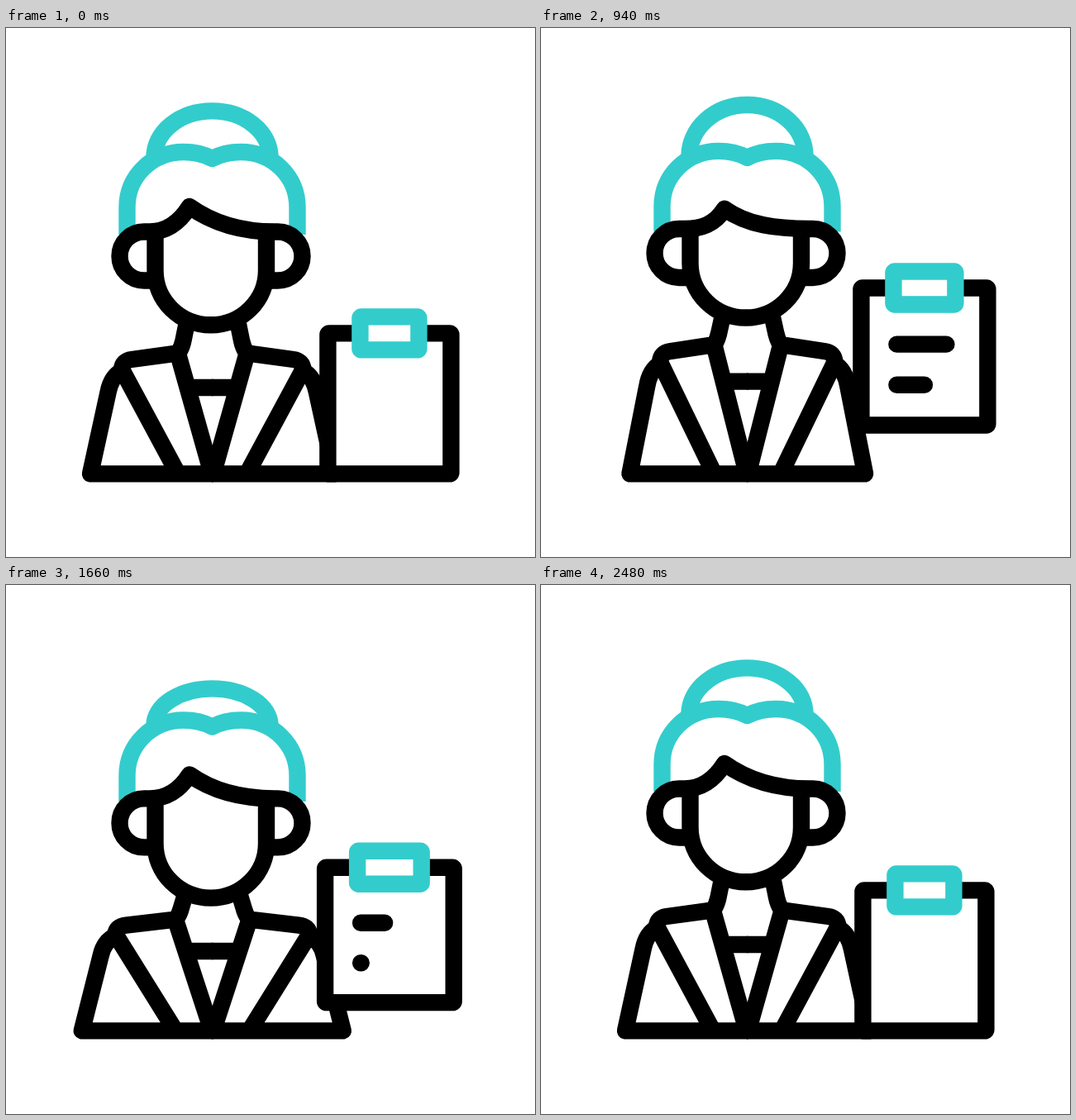
Animation, 640 px wide and 640 px high, one loop 2840 ms. Source, as an HTML page with a canvas:

```html
<!DOCTYPE html>
<html lang="en">
<head>
<meta charset="utf-8">
<title>Assistant with clipboard</title>
<style>
  html, body { margin: 0; width: 100%; height: 100%; overflow: hidden; background: #fff; }
  canvas { display: block; width: 100vmin; height: 100vmin; }
</style>
</head>
<body>
<canvas id="stage" width="640" height="640"></canvas>
<script>
const ctx = document.getElementById('stage').getContext('2d');
const LOOP = 2840, STEP = 20;
const TEAL = '#33cccc', BLACK = '#000', WHITE = '#fff';
const FLOOR = 539.4, BODY_X = 249.75, HAIR_X = 249.5;

const smooth = u => u * u * (3 - 2 * u);
const easeOut = u => 1 - (1 - u) * (1 - u);

function ease(t, from, to, curve = smooth) {
  return curve(Math.min(1, Math.max(0, (t - from) / (to - from))));
}

// Crouch by dip, rise and hold, crouch again, bounce past rest and settle.
// Loose parts trail by lag on the way up and by half of it on the way down.
function swing(t, { dip, rise, bounce, lag = 0, curve = smooth }) {
  const up = 435 + lag, land = 1700 + lag / 2;
  return dip * ease(t, 200, up)
    - (dip + rise) * ease(t, up, up + 745, curve)
    + (rise + dip) * ease(t, 1480, land)
    - (dip + bounce) * ease(t, land, land + 350, curve)
    + bounce * ease(t, land + 350, land + 660);
}

const base = { dip: 12, rise: 7.4, bounce: 6, curve: easeOut };
const shoulder = { dip: 13.5, rise: 13, bounce: 5, curve: easeOut };
const chinMove = { dip: 23, rise: 19, bounce: 14 };
const earMove = { dip: 25, rise: 25.5, bounce: 18, lag: 100 };
const hairMove = { dip: 26, rise: 22, bounce: 15, lag: 100 };
const fringe = { dip: 30, rise: 24, bounce: 16.4, lag: 130 };
const bunMove = { dip: 27, rise: 16, bounce: 8.5, lag: -26 };

function stroke(color) {
  ctx.strokeStyle = color;
  ctx.stroke();
}

function drawBody(t, chin) {
  const sx = 1 + swing(t, base) / 147.5;
  const sy = 1 - swing(t, shoulder) / 146;
  const neckTop = FLOOR - (FLOOR - chin + 6) / sy;
  for (const side of [1, -1]) {
    ctx.save();
    ctx.translate(BODY_X, FLOOR);
    ctx.scale(side * sx, sy);
    ctx.translate(-BODY_X, -FLOOR);
    ctx.beginPath();
    // neck and inner lapel
    ctx.moveTo(219.5, neckTop);
    ctx.lineTo(214.5, 378);
    ctx.quadraticCurveTo(213, 386, 208, 394);
    ctx.lineTo(249, FLOOR);
    // shoulder and outer lapel
    ctx.moveTo(208, 393.4);
    ctx.lineTo(152, 401);
    ctx.quadraticCurveTo(141, 402.5, 140, 413);
    ctx.lineTo(208, FLOOR);
    // arm and hem
    ctx.moveTo(140, 415);
    ctx.quadraticCurveTo(127, 422, 123.5, 441);
    ctx.lineTo(102, FLOOR);
    ctx.lineTo(BODY_X + 1, FLOOR);
    // shirt edge
    ctx.moveTo(225, 435);
    ctx.lineTo(BODY_X + 1, 435);
    ctx.restore();
    stroke(BLACK);
  }
}

function drawHair(t, ear) {
  const top = 150 + swing(t, hairMove), bun = 100.4 + swing(t, bunMove), bunEnd = top + 6;
  ctx.beginPath();
  ctx.ellipse(HAIR_X, bunEnd, 70, bunEnd - bun, 0, Math.PI, 2 * Math.PI);
  stroke(TEAL);

  const right = 2 * HAIR_X;
  ctx.beginPath();
  ctx.moveTo(146.5, ear - 26);
  ctx.lineTo(146.5, top + 67);
  ctx.bezierCurveTo(146.5, top + 30, 176, top, 215, top);
  ctx.bezierCurveTo(228, top, 240, top + 3, HAIR_X, top + 8);
  ctx.bezierCurveTo(right - 240, top + 3, right - 228, top, right - 215, top);
  ctx.bezierCurveTo(right - 176, top, right - 146.5, top + 30, right - 146.5, top + 67);
  ctx.lineTo(right - 146.5, ear - 26);
  stroke(TEAL);
}

function drawFace(t, chin, ear) {
  const r = 29.5, brow = ear - r, peak = 216 + swing(t, fringe);
  ctx.beginPath();
  ctx.moveTo(180.5, brow);
  ctx.lineTo(180.5, chin - 66);
  ctx.ellipse(247.75, chin - 66, 67.25, 66, 0, Math.PI, 0, true);
  ctx.lineTo(315, brow);
  ctx.fillStyle = WHITE;
  ctx.fill();
  stroke(BLACK);

  // ears joined by the fringe
  ctx.beginPath();
  ctx.moveTo(181, ear + r);
  ctx.arc(167, ear, r, Math.PI / 2, Math.PI * 1.5);
  ctx.lineTo(174, brow);
  ctx.bezierCurveTo(194, brow, 210, peak + 19, 222, peak);
  ctx.bezierCurveTo(250, peak + 20, 285, brow, 325, brow);
  ctx.arc(329, ear, r, -Math.PI / 2, Math.PI / 2);
  ctx.lineTo(315, ear + r);
  stroke(BLACK);
}

function panel(x, y, w, h, color) {
  ctx.beginPath();
  ctx.roundRect(x, y, w, h, 1.5);
  ctx.fillStyle = WHITE;
  ctx.fill();
  stroke(color);
}

function drawBoard(t) {
  const squash = 5.8 * (ease(t, 200, 600) - ease(t, 600, 1160) + ease(t, 1480, 1810) - ease(t, 1810, 2130));
  const stretch = 3.6 * (ease(t, 1810, 2130) - ease(t, 2130, 2480));
  const lift = 70 * (ease(t, 230, 1180) - ease(t, 1485, 1830));
  const width = 169 + 2 * (squash - stretch);
  const height = 190 - 2 * squash + 3 * stretch;
  const left = 463.9 - width / 2, top = 549.4 - lift - height;

  panel(left + 10, top + 10, width - 20, height - 20, BLACK);

  const lines = [
    [0.42, ease(t, 564, 1034) - ease(t, 1560, 1740)],
    [0.684, ease(t, 705, 1175) - ease(t, 1490, 1670)]
  ];
  ctx.lineCap = 'round';
  for (const [place, grown] of lines) {
    if (grown <= 0) continue;
    const x = left + 53, y = top + height * place;
    ctx.beginPath();
    ctx.moveTo(x, y);
    ctx.lineTo(x + grown * (width - 106), y);
    stroke(BLACK);
  }
  ctx.lineCap = 'butt';

  panel(left + 49, top - 10, width - 98, 40, TEAL);
}

function draw(now) {
  const t = Math.floor((now % LOOP) / STEP) * STEP;
  const chin = 359.3 + swing(t, chinMove), ear = 276 + swing(t, earMove);
  ctx.fillStyle = WHITE;
  ctx.fillRect(0, 0, 640, 640);
  ctx.lineWidth = 20.4;
  ctx.lineJoin = 'round';
  drawBody(t, chin);
  drawHair(t, ear);
  drawFace(t, chin, ear);
  drawBoard(t);
  requestAnimationFrame(draw);
}
requestAnimationFrame(draw);
</script>
</body>
</html>
```
